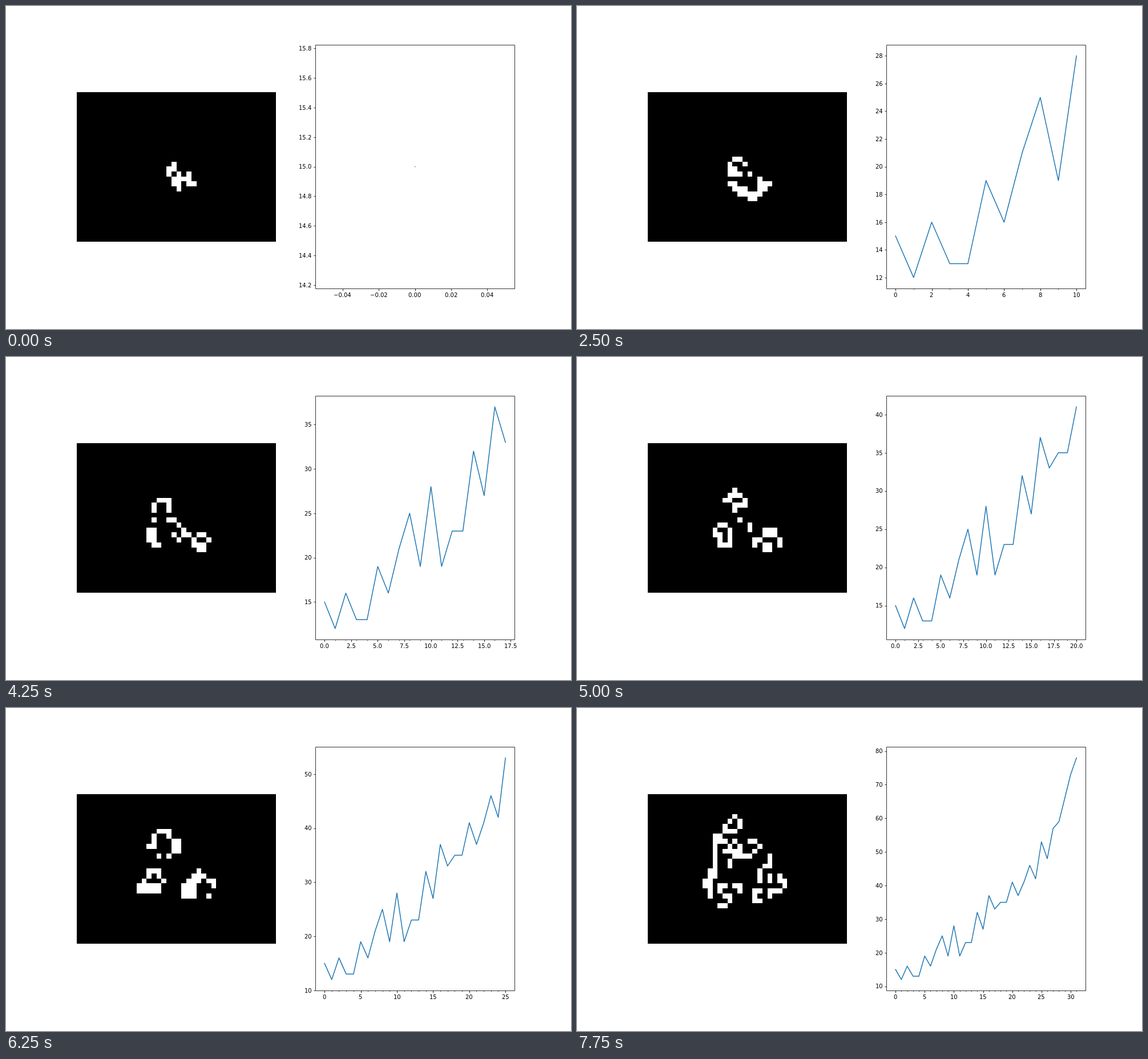
Animation, 990 px wide and 566 px high, one loop 8 s. Source, as an HTML page with a canvas:

```html
<!DOCTYPE html>
<html>
<head>
<meta charset="utf-8">
<style>
  html, body { margin: 0; overflow: hidden; background: #fff; }
  canvas { display: block; }
</style>
</head>
<body>
<canvas id="stage" width="990" height="566"></canvas>
<script>
const ctx = document.getElementById('stage').getContext('2d');
const COLS = 40, ROWS = 30, STEPS = 32, STEP_MS = 250;
const AXES = { left: 542.25, right: 891, top: 67.92, bottom: 495.25 };

// Starting pattern, with its top left cell at column 18, row 14
const SEED = ['.#....', '##....', '#.#.#.', '.####.', '.##.##', '..#...'];

const makeGrid = cell => Array.from({ length: ROWS }, (_, r) =>
  Array.from({ length: COLS }, (_, c) => cell(r, c)));

// Conway's Game of Life
function evolve(grid) {
  return makeGrid((r, c) => {
    let near = 0;
    for (let dr = -1; dr <= 1; dr++)
      for (let dc = -1; dc <= 1; dc++)
        if (dr || dc) near += grid[r + dr]?.[c + dc] || 0;
    return near === 3 || (near === 2 && grid[r][c]) ? 1 : 0;
  });
}

const generations = [makeGrid((r, c) => SEED[r - 14]?.[c - 18] === '#' ? 1 : 0)];
while (generations.length < STEPS) generations.push(evolve(generations.at(-1)));
const counts = generations.map(grid => grid.flat().reduce((a, b) => a + b));

// Axis limits with a 5% margin; a single value is widened first
function limits(values) {
  let lo = Math.min(...values), hi = Math.max(...values);
  if (lo === hi) {
    const widen = 0.05 * (Math.abs(lo) || 1);
    lo -= widen;
    hi += widen;
  }
  const margin = 0.05 * (hi - lo);
  return [lo - margin, hi + margin];
}

// Round tick values, at most nine intervals
function ticks([lo, hi]) {
  const raw = (hi - lo) / 9;
  const power = 10 ** Math.floor(Math.log10(raw));
  const step = [1, 2, 2.5, 5, 10].find(s => s * power >= raw) * power;
  const digits = [0, 1, 2].find(d => Math.abs(step - +step.toFixed(d)) < 1e-9);
  const list = [];
  for (let i = Math.ceil(lo / step); i * step <= hi; i++)
    list.push({ value: i * step, label: (i * step).toFixed(digits).replace('-', '\u2212') });
  return list;
}

function line(points, width, color) {
  ctx.beginPath();
  points.forEach(([x, y]) => ctx.lineTo(x, y));
  ctx.lineWidth = width;
  ctx.strokeStyle = color;
  ctx.stroke();
}

function drawGrid(grid) {
  const edgeX = c => Math.round(124.17 + 8.725 * c);
  const edgeY = r => Math.round(150.81 + 8.7 * r);
  ctx.fillStyle = '#000';
  ctx.fillRect(124, 151, 349, 262);
  ctx.fillStyle = '#fff';
  grid.forEach((row, r) => row.forEach((alive, c) => {
    if (alive) ctx.fillRect(edgeX(c), edgeY(r), edgeX(c + 1) - edgeX(c), edgeY(r + 1) - edgeY(r));
  }));
}

function drawChart(values) {
  const { left, right, top, bottom } = AXES;
  const xLim = limits(values.map((_, i) => i)), yLim = limits(values);
  const toX = v => left + (v - xLim[0]) / (xLim[1] - xLim[0]) * (right - left);
  const toY = v => bottom - (v - yLim[0]) / (yLim[1] - yLim[0]) * (bottom - top);

  ctx.lineCap = 'square';
  ctx.lineJoin = 'round';
  line(values.map((v, i) => [toX(i), toY(v)]), 1.5, '#1f77b4');

  ctx.lineCap = 'butt';
  ctx.fillStyle = '#000';
  ctx.font = '10px "DejaVu Sans", sans-serif';
  for (const { value, label } of ticks(xLim)) {
    const x = toX(value), px = Math.round(x) + 0.5;
    line([[px, 495.5], [px, 499.5]], 0.8, '#000');
    ctx.fillText(label, Math.round(x - ctx.measureText(label).width / 2), 510);
  }
  values.forEach((_, i) => {
    const px = Math.round(toX(i)) + 0.5;
    line([[px, 495.5], [px, 497.5]], 0.6, '#000');
  });
  for (const { value, label } of ticks(yLim)) {
    const y = toY(value), py = Math.round(y) + 0.5;
    line([[539.5, py], [542.5, py]], 0.8, '#000');
    ctx.fillText(label, Math.round(535.25 - ctx.measureText(label).width), Math.round(y + 3.8));
  }
  ctx.lineWidth = 0.8;
  ctx.strokeStyle = '#000';
  ctx.strokeRect(542.5, 68.5, 349, 427);
}

function draw() {
  const step = Math.floor(performance.now() / STEP_MS) % STEPS;
  ctx.fillStyle = '#fff';
  ctx.fillRect(0, 0, 990, 566);
  drawGrid(generations[step]);
  drawChart(counts.slice(0, step + 1));
  requestAnimationFrame(draw);
}
draw();
</script>
</body>
</html>
```
